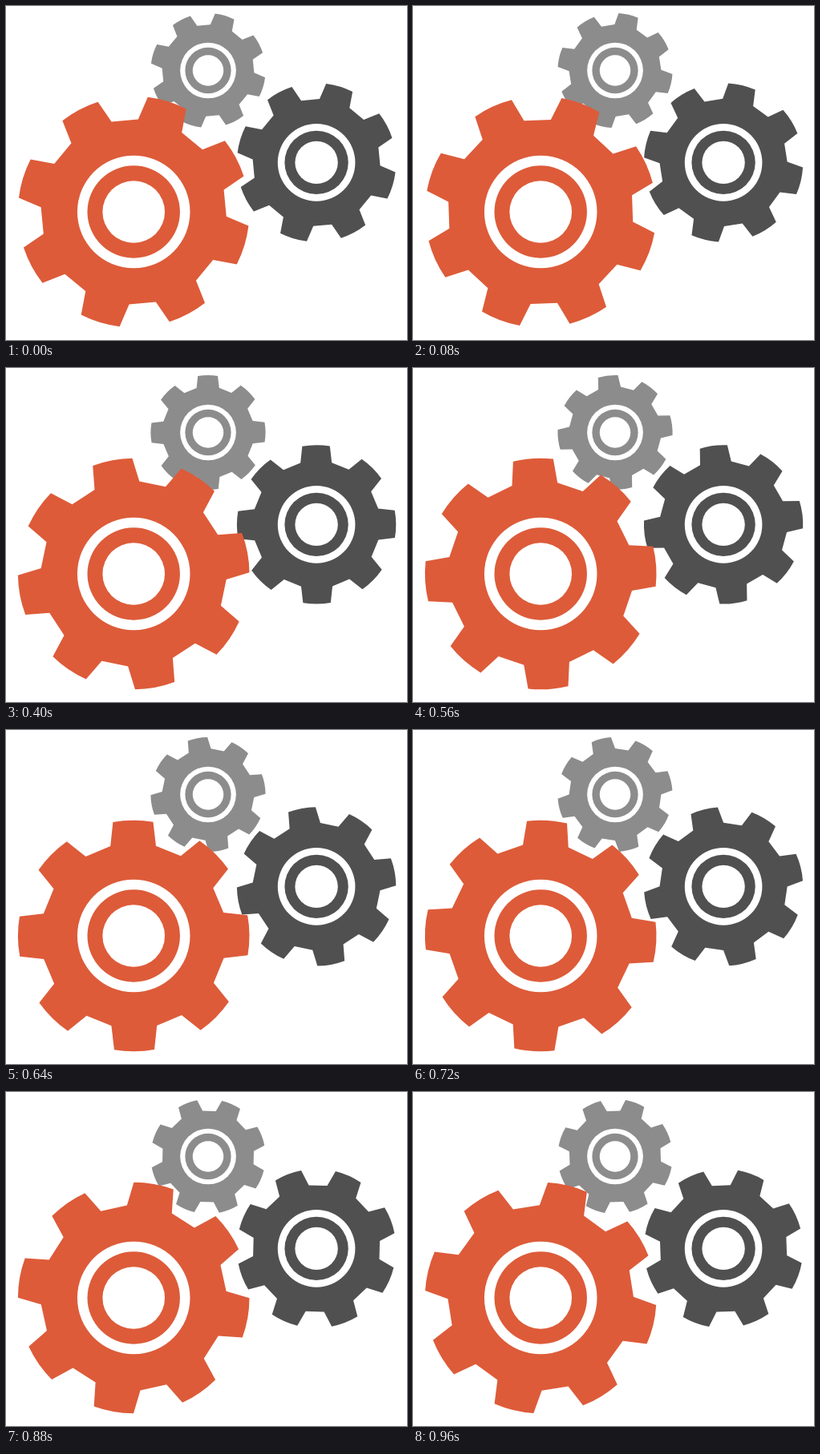
These frames come from a looping animation (500 by 417 pixels, 1040 ms). An HTML page:

```html
<!DOCTYPE html>
<html lang="en">
<head>
<meta charset="utf-8">
<title>Turning gears</title>
<style>
  html, body { margin: 0; width: 100%; height: 100%; overflow: hidden; background: #fff; }
  svg { display: block; width: 100vw; height: 100vh; }
</style>
</head>
<body>
<svg id="stage" viewBox="0 0 500 417" xmlns="http://www.w3.org/2000/svg"></svg>
<script>
const LOOP = 1040, STEPS = 13, TEETH = 8;
const PITCH = 360 / TEETH;
const TIP = 10, BASE = 14.2, ROOT = 0.802; // half angles of a tooth, root radius ratio
const START = 17;

// Back to front; dir is the turning direction.
const gears = [
  { x: 252, y: 80.5, r: 71.6, color: '#8c8c8c', dir: -1 },
  { x: 387.1, y: 195.4, r: 99.2, color: '#505050', dir: -1 },
  { x: 159.2, y: 257, r: 144.3, color: '#dd5b39', dir: 1 }
];

function add(parent, tag, attrs) {
  const node = document.createElementNS('http://www.w3.org/2000/svg', tag);
  for (const key in attrs) node.setAttribute(key, attrs[key]);
  return parent.appendChild(node);
}

// Point at an angle measured clockwise from straight up.
function polar(r, deg) {
  const a = deg * Math.PI / 180;
  return (r * Math.sin(a)).toFixed(2) + ' ' + (-r * Math.cos(a)).toFixed(2);
}

function gearPath(r) {
  let d = '';
  for (let i = 0; i < TEETH; i++) {
    const a = i * PITCH;
    d += (i ? 'L' : 'M') + polar(r * ROOT, a - BASE) +
      'L' + polar(r, a - TIP) +
      `A${r} ${r} 0 0 1 ` + polar(r, a + TIP) +
      'L' + polar(r * ROOT, a + BASE);
  }
  return d + 'Z';
}

const stage = document.getElementById('stage');
for (const g of gears) {
  const group = add(stage, 'g', { transform: `translate(${g.x} ${g.y})` });
  g.body = add(group, 'path', { d: gearPath(g.r), fill: g.color });
  const disc = (ratio, fill) => add(group, 'circle', { r: g.r * ratio, fill });
  disc(0.487, '#fff');
  disc(0.4, g.color);
  disc(0.269, '#fff');
}

function draw(ms) {
  const step = Math.floor((ms % LOOP) / (LOOP / STEPS));
  for (const g of gears) {
    g.body.setAttribute('transform', `rotate(${START + g.dir * step * PITCH / STEPS})`);
  }
}

function tick() {
  draw(performance.now());
  requestAnimationFrame(tick);
}
draw(0);
requestAnimationFrame(tick);
</script>
</body>
</html>
```
